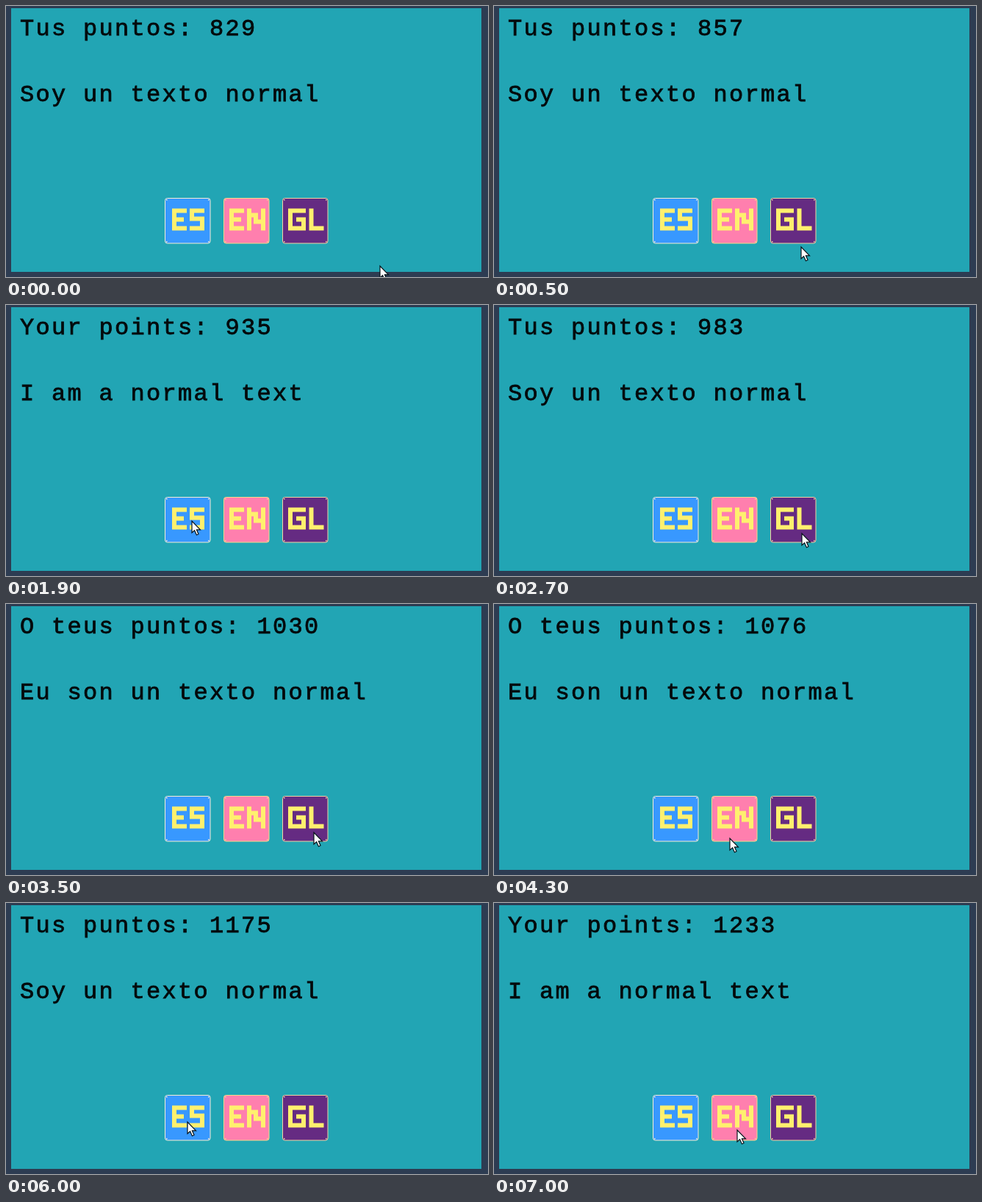
An HTML page with a canvas for the animation above (7.1 s loop, 656 by 370 pixels).

```html
<!DOCTYPE html>
<html lang="es">
<head>
<meta charset="utf-8">
<title>Language switch</title>
<style>
  html, body { margin: 0; width: 100%; height: 100%; overflow: hidden; background: #2d3c52; }
  canvas { display: block; }
</style>
</head>
<body>
<canvas id="stage" width="656" height="370"></canvas>
<script>
const ctx = document.getElementById('stage').getContext('2d');
const LOOP = 7100, STEP = 100;
const ADVANCE = 21.5, FONT_SIZE = 32;
const LINGER = 200; // pause after a click before the pointer leaves

const texts = {
  es: ['Tus puntos: ', 'Soy un texto normal'],
  en: ['Your points: ', 'I am a normal text'],
  gl: ['O teus puntos: ', 'Eu son un texto normal']
};

// The pointer rests at each place; its click sets the language.
const visits = [
  { arrive: 0, click: 0, language: 'es', x: 509, y: 355 },
  { arrive: 800, click: 900, language: 'en', x: 327, y: 303 },
  { arrive: 1800, click: 2100, language: 'es', x: 253, y: 295 },
  { arrive: 2700, click: 3300, language: 'gl', x: 419, y: 312 },
  { arrive: 4300, click: 4500, language: 'en', x: 321, y: 320 },
  { arrive: 5600, click: 5800, language: 'es', x: 247, y: 299 },
  { arrive: 6700, click: 6800, language: 'en', x: 331, y: 310 }
];

// Centre lines of the block letters, 30 px tall.
const letters = {
  E: new Path2D('M20 3H3V27H20M3 15H16'),
  S: new Path2D('M20 3H3V14H17V27H0'),
  N: new Path2D('M3 30V0M22 30V0M3 9H12V18H22'),
  G: new Path2D('M24 3H3V27H21V15H11'),
  L: new Path2D('M3 0V27H20')
};
const buttons = [
  { label: 'ES', inset: 10, fill: '#3898ff', rim: '#f7edd2' },
  { label: 'EN', inset: 8, fill: '#ff7fae', rim: '#ffd98a' },
  { label: 'GL', inset: 8, fill: '#652b82', rim: '#f3d3a2' }
];

const lerp = (a, b, u) => a + (b - a) * u;
const clamp = u => Math.min(1, Math.max(0, u));
const smooth = u => u * u * (3 - 2 * u);

// The counter runs steadily, slightly faster from 1.9 s to 2.7 s.
function pointsAt(t) {
  if (t < 1900) return Math.round(lerp(829, 935, t / 1900));
  if (t < 2700) return Math.round(lerp(935, 983, (t - 1900) / 800));
  return Math.round(lerp(983, 1233, (t - 2700) / 4300));
}

function pointerAt(t) {
  let { x, y } = visits[0];
  visits.slice(1).forEach((visit, i) => {
    const leave = visits[i].click + LINGER;
    const u = smooth(clamp((t - leave) / (visit.arrive - leave)));
    x = lerp(x, visit.x, u);
    y = lerp(y, visit.y, u);
  });
  return { x, y };
}

function drawLine(text, baseline) {
  ctx.font = `${FONT_SIZE}px "Liberation Mono", monospace`;
  ctx.letterSpacing = `${ADVANCE - FONT_SIZE * 0.6}px`;
  ctx.fillStyle = ctx.strokeStyle = '#040a0c';
  ctx.lineWidth = 0.8;
  ctx.fillText(text, 19, baseline);
  ctx.strokeText(text, 19, baseline);
}

function drawButton({ label, inset, fill, rim }, index) {
  ctx.save();
  ctx.translate(216 + index * 80, 262);
  ctx.beginPath();
  ctx.roundRect(0.5, 0.5, 61.5, 61.5, 3);
  ctx.fillStyle = fill;
  ctx.fill();
  ctx.strokeStyle = rim;
  ctx.lineWidth = 1;
  ctx.stroke();
  ctx.fillStyle = rim;
  for (const x of [2, 59]) for (const y of [2, 59]) ctx.fillRect(x, y, 1.5, 1.5);

  ctx.strokeStyle = '#fff06e';
  ctx.lineWidth = 6;
  ctx.translate(inset, 14.5);
  ctx.stroke(letters[label[0]]);
  ctx.translate(label === 'GL' ? 28.5 : 24, 0);
  ctx.stroke(letters[label[1]]);
  ctx.restore();
}

function drawPointer({ x, y }) {
  ctx.save();
  ctx.translate(x, y);
  const arrow = new Path2D('M0 0V16L3.6 12.7L6.4 19L9 17.8L6.4 11.8H11.5Z');
  ctx.fillStyle = '#fff';
  ctx.fill(arrow);
  ctx.strokeStyle = '#07131a';
  ctx.lineWidth = 1.2;
  ctx.stroke(arrow);
  ctx.restore();
}

function render(now) {
  const t = Math.floor((now % LOOP) / STEP) * STEP;
  const { language } = visits.filter(({ click }) => click <= t).pop();
  const [label, sentence] = texts[language];

  ctx.fillStyle = '#2d3c52';
  ctx.fillRect(0, 0, 656, 370);
  ctx.fillStyle = '#22a5b4';
  ctx.fillRect(7, 3, 640, 360);

  drawLine(label + pointsAt(t), 39.5);
  drawLine(sentence, 129.5);
  buttons.forEach(drawButton);
  drawPointer(pointerAt(t));
}

const start = performance.now();
function tick() {
  render(performance.now() - start);
  requestAnimationFrame(tick);
}
tick();
</script>
</body>
</html>
```
